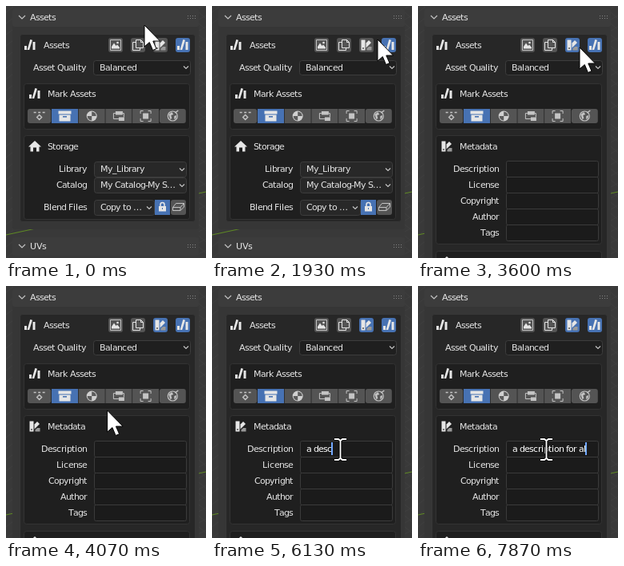
Animation, 250 px wide and 316 px high, one loop 8 s. Source, as an HTML page:

```html
<!DOCTYPE html>
<html lang="en">
<head>
<meta charset="utf-8">
<title>Asset panel</title>
<style>
html, body { margin: 0; width: 100%; height: 100%; overflow: hidden; background: #393939; }
svg { display: block; width: 250px; height: 316px; }
text { font: 11px "DejaVu Sans", sans-serif; white-space: pre; }
</style>
</head>
<body>
<svg id="stage" viewBox="0 0 250 316"></svg>
<script>
const LOOP = 8000;
const BLUE = '#4772b3', GREY = '#545454', LIGHT = '#e6e6e6', DIM = '#c4c4c4';
const stage = document.getElementById('stage');
const ruler = document.createElement('canvas').getContext('2d');
ruler.font = '100px "DejaVu Sans", sans-serif';

// Glyph advances are truncated to whole pixels, as in the UI's hinted text.
const advance = c => Math.floor(ruler.measureText(c).width * 0.11 + 0.001);
const width = s => [...s].reduce((sum, c) => sum + advance(c), 0);

function text(x, y, s, fill = LIGHT) {
  const xs = [...s].map(c => { const at = x; x += advance(c); return at; });
  return s && `<text x="${xs.join(' ')}" y="${y}" fill="${fill}">${s}</text>`;
}
const label = (y, s) => text(101 - width(s), y, s);

const rect = (x, y, w, h, fill, r = 0) =>
  `<rect x="${x}" y="${y}" width="${w}" height="${h}" rx="${r}" fill="${fill}"/>`;
const frame = (x, y, w, h, fill, line, r = 3) =>
  `<rect x="${x + .5}" y="${y + .5}" width="${w - 1}" height="${h - 1}" rx="${r}" fill="${fill}" stroke="${line}"/>`;
const line = (d, color = LIGHT, w = 1) =>
  `<path d="${d}" fill="none" stroke="${color}" stroke-width="${w}"/>`;
const shape = (d, color = LIGHT) => `<path d="${d}" fill="${color}"/>`;
const at = (x, y, body) => `<g transform="translate(${x} ${y})">${body}</g>`;
const box = (y, h) => frame(22, y, 208, h, '#1f1f1f', '#333');
const chevron = (x, y, r = 3) => line(`M${x - r} ${y - r / 2}l${r} ${r} ${r}-${r}`, DIM, 1.2);

// Icons are centred on 0,0.
const icon = {
  books: shape('M-7 1h3v5h-3zM-3.5 6L.3-7 3-6.2-.8 6zM3.500-4H6.500V6H3.500z'),
  image: line('M-6.500-6.500h13v13h-13z', DIM) + shape('M-5 4.500V2l3-4.500 2.500 3.500 1.500-1.500L5 3v1.500z') +
    '<circle cx="2.5" cy="-3" r="1.3" fill="#e6e6e6"/>',
  copy: line('M-2.500-6.500H3.500L6.500-3.500V3.500H-2.500zM3.500-6.500v3h3M-2.500-3.500h-4v10h9v-3'),
  swatch: shape('M-6.500-6.500h5v13h-5z') + shape('M-.5-2.500L3-6 6-3-.5 3.500z') +
    shape('M.500 4.500L3 2H6.500V6.500H.500z', '#999') + rect(-5, 3, 2, 2, '#777'),
  home: shape('M0-7L8 .5H5.5V6.5H2V1.5H-2v5h-3.5V.5H-8z'),
  archive: shape('M-8-6.5H8v4H-8zM-7-1.5H7v8H-7z') + rect(-2.5, 0, 5, 1.6, BLUE),
  lock: shape('M-4.500-1h9v6.500h-9z') + line('M-2.5-1v-2a2.5 2.5 0 0 1 5 0v2', LIGHT, 1.5) + rect(-.5, 1, 1, 2, BLUE),
  crate: line('M-7 .5h9.500v4H-7zM-7 .5l4-5H7l-4.500 5M7-4.500V0L2.500 4.500', DIM)
};

const tabs = [
  line('M-7-4.500h3M-1.500-4.500h3M4-4.500h3M0-1.500l3 3-3 3-3-3z', DIM, 1.4),
  icon.archive,
  '<circle r="6.5" fill="#d0d0d0"/>' + shape('M0-5.500A5.500 5.500 0 0 1 5.500 0H0zM0 5.500A5.500 5.500 0 0 1-5.500 0H0z', '#5c5c5c'),
  shape('M-4-6h9v4.500h-9zM0 1.500h7V6H0z', DIM) + line('M-4-3.500h-2.500v7H0M5-3.500h1.500v5', DIM),
  shape('M-3.5-3.5h7v7h-7z', DIM) + line('M-6.500-3v-3.500h3.500M3-6.500h3.500V-3M6.500 3v3.500H3M-3 6.500h-3.500V3', DIM),
  '<circle r="6" fill="none" stroke="#c4c4c4" stroke-width="1.2"/>' + shape('M-5-2l4-3 2 3-3 1 1 4-2 1zM2 0l3-1-1 4-2 1z', DIM) +
    line('M3-4l4-3', DIM, 1.5)
];

function heading(y, title) {
  let dots = '';
  for (let i = 0; i < 8; i++) dots += rect(227 + i % 4 * 3, y - 2 + (i >> 2) * 3, 1, 1, '#858585');
  return rect(8, y - 11, 233, 23, '#3c3c3c', 3) + chevron(20, y, 4) + text(30, y + 4, title) + dots;
}

function backdrop() {
  let d = '';
  for (let y = -20; y < 340; y += 14) d += `M0 ${y}L9 ${y - 7}M241 ${y}l9 8M241 ${y + 9}l9-5`;
  return rect(0, 0, 250, 316, '#393939') + line(d, '#424242', .7) +
    line('M0 287L250 233', '#5f8a24', 1.2);
}

function tools(metaOn, hover) {
  const looks = [
    ['image', GREY], ['copy', GREY],
    ['swatch', metaOn ? BLUE : hover ? '#656565' : GREY], ['books', BLUE]
  ];
  return looks.map(([name, fill], i) =>
    rect(128 + 28 * i, 40, 18, 18, fill, 3) + at(137 + 28 * i, 49, icon[name])).join('');
}

function markBox() {
  const row = tabs.map((t, i) => {
    const x = i ? 23.3 + 33.7 * i : 27, end = 56.3 + 33.7 * i;
    return rect(x, 129, end - x, 18, i == 1 ? BLUE : GREY, i % 5 ? 0 : 3) + at((x + end) / 2, 138, t);
  });
  return box(97, 58) + at(36, 110, icon.books) + text(52, 114, 'Mark Assets') + row.join('');
}

function storageBox() {
  const field = (y, w, s) => frame(110, y - 13, w, 20, '#282828', '#3d3d3d') + text(118, y, s);
  return box(162, 106) + at(36, 176, icon.home) + text(52, 180, 'Storage') +
    label(208, 'Library') + field(208, 116, 'My_Library') + chevron(220, 205) +
    label(228, 'Catalog') + field(228, 116, 'My Catalog-My S…') + chevron(220, 225) +
    label(256, 'Blend Files') + field(256, 76, 'Copy to …') + chevron(179, 253) +
    rect(186, 243, 19, 19, BLUE) + at(195.500, 252, icon.lock) +
    rect(206, 243, 19, 19, GREY, 3) + at(215.500, 252, icon.crate);
}

const PHRASE = 'a description for al';
const KEYS = [5130, 5270, 5470, 5670, 5800, 6130, 6330, 6470, 6530, 6670,
  6730, 6870, 6930, 7070, 7270, 7330, 7330, 7400, 7800, 7870];
const EDIT = 4730;

function metadataBox(t) {
  const rows = ['Description', 'License', 'Copyright', 'Author', 'Tags'].map((s, i) =>
    label(208 + 20 * i, s) + frame(110, 194 + 20 * i, 116, 21, '#1b1b1b', '#3b3b3b', 2));
  let out = box(162, 137) + at(36, 176, icon.swatch) + text(52, 180, 'Metadata') + rows.join('');
  if (t >= EDIT) {
    const typed = PHRASE.slice(0, KEYS.filter(k => k <= t).length);
    out += text(118, 208, typed, '#fff') + rect(117 + width(typed), 196, 2, 16, '#71a8ff');
  }
  return out;
}

// Pointer tip: time, x, y.
const PATH = [
  [0, 173, 24], [330, 86, 66], [1270, 86, 66], [1330, 87, 66], [1600, 145, 53],
  [1800, 200, 39], [1930, 207, 42], [2330, 207, 42], [2600, 202, 50], [3530, 202, 50],
  [3600, 202, 52], [3870, 152, 106], [4130, 119, 171], [4270, 132, 194],
  [4400, 152, 190], [4670, 158, 200]
];

function pointer(t) {
  if (t >= EDIT) {
    const beam = 'M153 192h5l2.500 2 2.500-2h5M160.500 194v22M153 218h5l2.500-2 2.500 2h5';
    return line(beam, '#000', 4) + line(beam, '#fff', 1.8);
  }
  const i = PATH.findIndex(p => p[0] > t);
  let [, x, y] = PATH.at(-1);
  if (i > 0) {
    const [a, b] = [PATH[i - 1], PATH[i]], k = (t - a[0]) / (b[0] - a[0]);
    x = a[1] + (b[1] - a[1]) * k;
    y = a[2] + (b[2] - a[2]) * k;
  }
  return at(x, y, '<path d="M0 0V27L6.300 21.500 10.500 31.500 15 29.600 10.800 20H19.500Z" fill="#fff" stroke="#000"/>');
}

function scene(t) {
  const open = t >= 3000;
  return backdrop() +
    rect(8, 3, 233, open ? 330 : 277, '#363636', 3) + heading(14, 'Assets') +
    frame(17, 35, 220, open ? 390 : 236, '#272727', '#383838') +
    at(30, 49, icon.books) + text(47, 53, 'Assets') + tools(t >= 2930, t >= 2400) +
    text(34, 81, 'Asset Quality') + frame(109, 68, 122, 19, '#1f1f1f', '#3d3d3d') +
    text(117, 81, 'Balanced') + chevron(225, 77) + markBox() +
    (open ? metadataBox(t) + at(0, 145, storageBox()) : storageBox() + heading(301, 'UVs')) +
    pointer(t);
}

const start = performance.now();
let shown = -1;
function tick() {
  const ms = (performance.now() - start) % LOOP;
  const t = Math.round(Math.floor((ms + 4) * 3 / 200) * 20 / 3) * 10 % LOOP;
  if (t !== shown) stage.innerHTML = scene(shown = t);
  requestAnimationFrame(tick);
}
tick();
</script>
</body>
</html>
```
